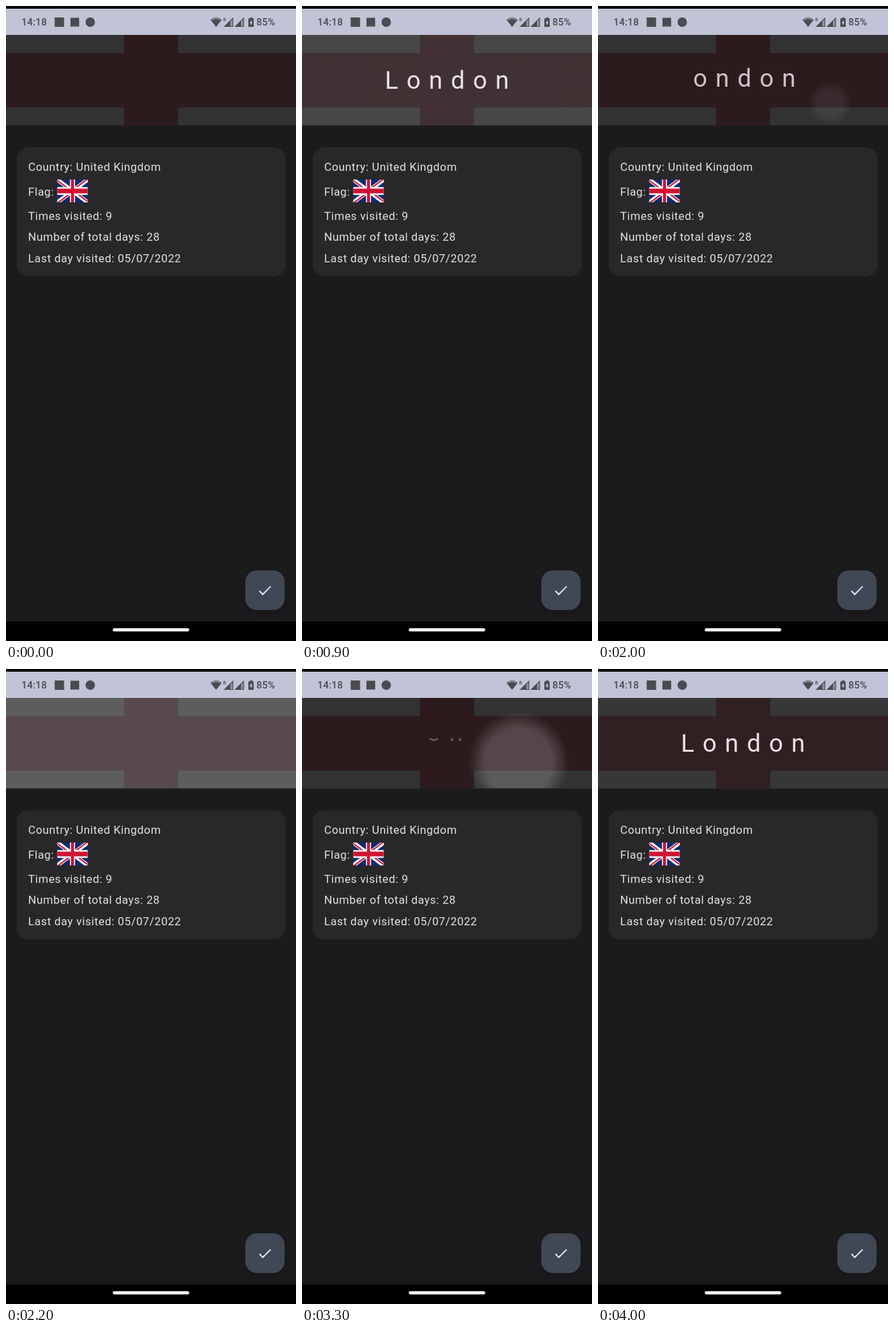
An HTML page for the animation above (4100 ms loop, 432 px wide and 944 px high).

```html
<!DOCTYPE html>
<html lang="en">
<head>
<meta charset="utf-8">
<title>Country card</title>
<style>
  html, body { margin: 0; width: 100%; height: 100%; overflow: hidden; background: #000; }
  svg { display: block; width: 432px; height: 944px; font-family: Roboto, sans-serif; }
  .body { font-size: 16.8px; letter-spacing: .525px; fill: #e4e2e6; }
  .status { font-size: 14.6px; font-weight: 500; letter-spacing: .2px; fill: #49494f; }
  .city { font-size: 36.75px; letter-spacing: 12.35px; fill: #e8e3e6; }
</style>
</head>
<body>
<svg viewBox="0 0 432 944">
  <defs>
    <clipPath id="header"><rect y="43" width="432" height="134.5"/></clipPath>
    <clipPath id="window"><rect id="pane"/></clipPath>
    <clipPath id="quarters"><path d="M30 15H60V30ZM30 15V30H0ZM30 15H0V0ZM30 15V0H60Z"/></clipPath>
    <radialGradient id="glow">
      <stop offset="0" stop-color="#fff"/>
      <stop id="edge" offset=".6" stop-color="#fff"/>
      <stop offset="1" stop-color="#fff" stop-opacity="0"/>
    </radialGradient>
    <filter id="shadow" x="-30%" y="-30%" width="160%" height="160%">
      <feDropShadow dx="0" dy="3" stdDeviation="4" flood-color="#000" flood-opacity=".3"/>
    </filter>
  </defs>

  <rect width="432" height="944"/>
  <rect y="43" width="432" height="872" fill="#1b1b1d"/>

  <!-- status bar -->
  <rect y="4" width="432" height="39" fill="#c1c4d6"/>
  <g fill="#4b4b51">
    <text class="status" x="23" y="29">14:18</text>
    <rect x="72.5" y="17" width="14" height="14"/>
    <rect x="96" y="17.5" width="13" height="13"/>
    <circle cx="125.5" cy="24" r="7"/>
    <path d="M304.5 20.5Q313 13.5 321.500 20.5L313 31Z"/>
    <path d="M306.300 21Q313 16 319.700 21" fill="none" stroke="#c1c4d6" stroke-width=".9"/>
    <text x="323.500" y="22.500" font-size="7" font-weight="500">R</text>
    <path d="M338 18V30.500H325.500Z M354 18V30.500H341.500Z" fill="#8f9099"/>
    <path d="M334 22V30.500H325.500Z M350 22V30.500H341.500Z"/>
    <path d="M338 18V30.500H325.500Z M354 18V30.500H341.500Z" fill="none" stroke="#4b4b51" stroke-width="1.100"/>
    <path d="M363.500 17H367V18.500H369V31H361V18.500H363.500Z"/>
    <path d="M366 20.500L362.700 25.500H364.700V29L367.500 24H365.700Z" fill="#c1c4d6"/>
    <text class="status" x="373" y="29">85%</text>
  </g>

  <!-- header -->
  <g clip-path="url(#header)">
    <rect y="43" width="432" height="135" fill="#323234"/>
    <path d="M0 70H176V43H256.500V70H432V151H256.500V178H176V151H0Z" fill="#2c1a1d"/>
    <g clip-path="url(#window)">
      <text id="city" class="city" x="123.600" y="123.500">London</text>
    </g>
    <circle id="ripple" fill="url(#glow)"/>
  </g>

  <!-- details -->
  <rect x="16" y="210" width="400" height="192" rx="16.800" fill="#28282a"/>
  <g class="body">
    <text x="33" y="245">Country: United Kingdom</text>
    <text x="33" y="281.500">Flag:</text>
    <text x="33" y="318">Times visited: 9</text>
    <text x="33" y="349.300">Number of total days: 28</text>
    <text x="33" y="380.800">Last day visited: 05/07/2022</text>
  </g>
  <svg x="76.300" y="258" width="45.500" height="34" viewBox="0 0 60 30" preserveAspectRatio="none">
    <rect width="60" height="30" fill="#0b2a70"/>
    <path d="M0 0L60 30M60 0L0 30" stroke="#fff" stroke-width="6"/>
    <path d="M0 0L60 30M60 0L0 30" stroke="#cf1233" stroke-width="4" clip-path="url(#quarters)"/>
    <path d="M30 0V30M0 15H60" stroke="#fff" stroke-width="10"/>
    <path d="M30 0V30M0 15H60" stroke="#cf1233" stroke-width="6"/>
  </svg>

  <!-- button and navigation -->
  <rect x="356.500" y="839" width="58.500" height="59" rx="17" fill="#414754" filter="url(#shadow)"/>
  <path d="M377.500 869.500L382.500 874.700L394.300 862.900" fill="none" stroke="#dfe3f2" stroke-width="2"/>
  <rect x="159" y="925" width="114" height="4.800" rx="2.400" fill="#f4f4f4"/>
</svg>
<script>
const LOOP = 4100, STEP = 100;
const CENTER = { x: 216, y: 110 }, TEXT = { w: 197, h: 46 };
const GROW = 240, FADE_IN = 75, FADE_OUT = 375, STRENGTH = .21;

// press: ripple starts, click: text toggles, release: ripple fades
const TAPS = [
  { press: 295, click: 352, release: 705, x: 350, y: 158, show: true },
  { press: 1975, click: 1967, release: 2390, x: 350, y: 146, show: false },
  { press: 3230, click: 3245, release: 3668, x: 350, y: 146, show: true }
];

const $ = id => document.getElementById(id);
const [city, pane, ripple, edge] = ['city', 'pane', 'ripple', 'edge'].map($);
const clamp = v => Math.min(1, Math.max(0, v));
const mix = (a, b, p) => a + (b - a) * p;
const smooth = v => v * v * (3 - 2 * v);
const set = (el, attrs) => {
  for (const key in attrs) el.setAttribute(key, attrs[key]);
};
const lastTap = (key, t) => TAPS.filter(tap => tap[key] <= t).pop();

// critically damped spring, stiffness 400
function textAmount(t) {
  const tap = lastTap('click', t);
  if (!tap) return 0;
  const a = (t - tap.click) * .02;
  const rest = (1 + a) * Math.exp(-a);
  return tap.show ? 1 - rest : rest;
}

// the window grows from the middle, text stays on its bottom right corner
function drawText(t) {
  const p = textAmount(t), w = TEXT.w * p, h = TEXT.h * p;
  set(pane, { x: CENTER.x - w / 2, y: CENTER.y - h / 2, width: w, height: h });
  set(city, {
    transform: `translate(${(w - TEXT.w) / 2} ${(h - TEXT.h) / 2})`,
    opacity: p < .01 ? 0 : p
  });
}

function drawRipple(t) {
  const tap = lastTap('press', t);
  if (!tap) return set(ripple, { opacity: 0 });
  const age = t - tap.press;
  const p = smooth(clamp(age / GROW));
  const fade = clamp(age / FADE_IN) * (1 - clamp((t - tap.release) / FADE_OUT));
  set(ripple, {
    cx: mix(tap.x, CENTER.x, p),
    cy: mix(tap.y, CENTER.y, p),
    r: mix(25, 270, p),
    opacity: STRENGTH * fade
  });
  set(edge, { offset: mix(.6, .9, p) });
}

function draw(now) {
  const t = Math.floor((now % LOOP) / STEP) * STEP;
  drawText(t);
  drawRipple(t);
}

const start = performance.now();
function tick() {
  draw(performance.now() - start);
  requestAnimationFrame(tick);
}
tick();
</script>
</body>
</html>
```
